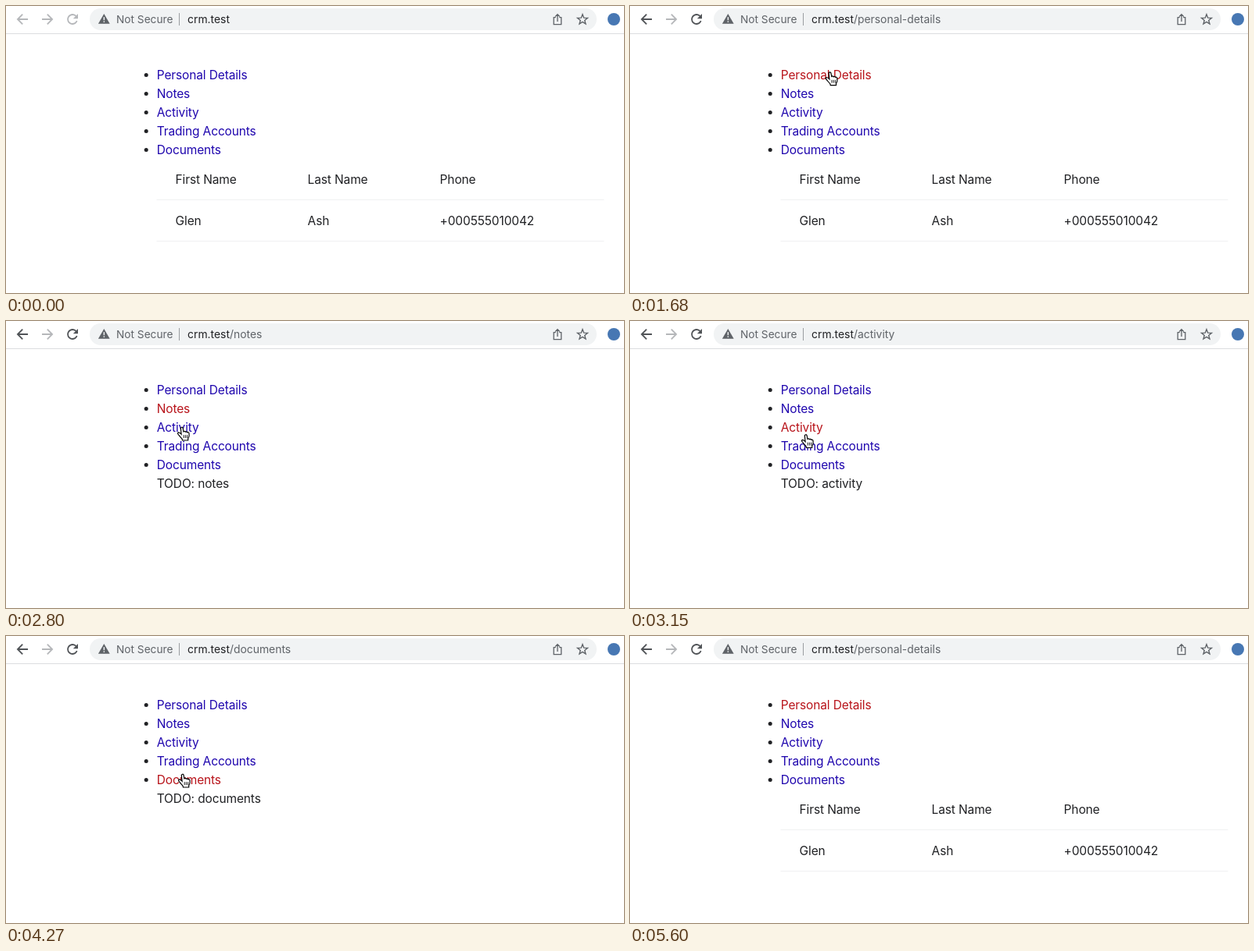
Write an HTML page with a canvas that moves like this. It is 790 by 368 pixels and loops after 5.81 s.

```html
<!DOCTYPE html>
<html lang="en">
<head>
<meta charset="utf-8">
<title>CRM navigation</title>
<style>
  html, body { margin: 0; width: 100%; height: 100%; overflow: hidden; background: #fff; }
  canvas { display: block; width: 790px; height: 368px; }
</style>
</head>
<body>
<canvas id="stage"></canvas>
<script>
const W = 790, H = 368, LOOP = 5810, STEP = 70;
const canvas = document.getElementById('stage');
const ctx = canvas.getContext('2d');
const dpr = window.devicePixelRatio || 1;
canvas.width = W * dpr;
canvas.height = H * dpr;

const INK = '#202124', GREY = '#5f6368', PALE = '#b5b7ba', PILL = '#f1f3f4';
const BLUE = '#1f06ae', RED = '#b8131a';
const BODY = '15.5px Inter, "Open Sans", sans-serif';
const LABEL = '13.7px Inter, "Open Sans", sans-serif';
const URL_FONT = '13.9px Inter, "Open Sans", sans-serif';

const links = ['Personal Details', 'Notes', 'Activity', 'Trading Accounts', 'Documents'];
const fields = [['First Name', 'Glen'], ['Last Name', 'Ash'], ['Phone', '+000555010042']];
const linkY = i => 88 + i * 24;

// Links are clicked in order, then the first one again.
const clicks = [1260, 2170, 2940, 3500, 4130, 5040];

// Each pointer move: start, end, x, y.
const entry = { x: 505, y: 296 }, enters = 70, leaves = 5600;
const moves = [
  [70, 420, 425, 171],
  [490, 910, 259, 82],
  [1610, 1960, 228, 107],
  [2170, 2590, 228, 126],
  [2660, 2800, 225, 136],
  [3010, 3290, 225, 155],
  [3570, 3850, 226, 177],
  [4270, 4480, 225, 148],
  [4760, 4970, 229, 86],
  [5110, 5460, 238, 345]
];

const ease = p => p * p * (3 - 2 * p);
const clamp = p => Math.min(1, Math.max(0, p));

function pointerAt(t) {
  let { x, y } = entry;
  for (const [from, to, x1, y1] of moves) {
    const p = ease(clamp((t - from) / (to - from)));
    x += (x1 - x) * p;
    y += (y1 - y) * p;
  }
  return { x, y };
}

function pageAt(t) {
  const done = clicks.filter(c => c < t).length;
  return done ? (done - 1) % links.length : -1;
}

function text(str, x, y, color, font = BODY) {
  ctx.font = font;
  ctx.letterSpacing = font === BODY ? '-0.13px' : '0px';
  ctx.fillStyle = color;
  ctx.fillText(str, x, y);
  return ctx.measureText(str).width;
}

function rect(x, y, w, h, color) {
  ctx.fillStyle = color;
  ctx.fillRect(x, y, w, h);
}

function stroke(path, color, width) {
  ctx.strokeStyle = color;
  ctx.lineWidth = width;
  ctx.stroke(new Path2D(path));
}

function fill(path, color) {
  ctx.fillStyle = color;
  ctx.fill(new Path2D(path));
}

function disc(x, y, r, color) {
  ctx.beginPath();
  ctx.arc(x, y, r, 0, Math.PI * 2);
  ctx.fillStyle = color;
  ctx.fill();
}

function arc(x, y, r, from, to, color, width) {
  ctx.beginPath();
  ctx.arc(x, y, r, from, to);
  ctx.strokeStyle = color;
  ctx.lineWidth = width;
  ctx.stroke();
}

function star(cx, cy, outer, inner) {
  ctx.beginPath();
  for (let i = 0; i < 10; i++) {
    const a = i * Math.PI / 5 - Math.PI / 2, r = i % 2 ? inner : outer;
    ctx.lineTo(cx + r * Math.cos(a), cy + r * Math.sin(a));
  }
  ctx.closePath();
  ctx.strokeStyle = GREY;
  ctx.lineWidth = 1.4;
  ctx.stroke();
}

// Horizontal arrow; dir is -1 for back, 1 for forward.
function navArrow(x, dir, color) {
  ctx.save();
  ctx.translate(x, 17);
  ctx.scale(dir, 1);
  stroke('M-7 0H5.5M-.2 -6.3L6.1 0L-.2 6.3', color, 1.8);
  ctx.restore();
}

function toolbar(page, active) {
  const tone = active ? '#505357' : PALE;
  rect(0, 35, W, 1, '#dcdde0');
  navArrow(21, -1, tone);
  navArrow(53, 1, PALE);
  arc(85, 17, 6, 0.35, -0.75, tone, 1.8);
  fill('M92 10V16.2H85.8Z', tone);

  ctx.beginPath();
  ctx.roundRect(107, 3, 648, 28, 14);
  ctx.fillStyle = PILL;
  ctx.fill();

  fill('M125.3 10L132.7 22.7H117.9Z', GREY);
  rect(124.6, 14.2, 1.5, 4, PILL);
  rect(124.6, 19.4, 1.5, 1.5, PILL);
  text('Not Secure', 141, 22, GREY, LABEL);
  rect(221, 9, 1, 16, '#9a9da1');

  const hostWidth = text('crm.test', 232, 22, INK, URL_FONT);
  if (page >= 0) {
    const slug = links[page].toLowerCase().replace(' ', '-');
    text('/' + slug, 232 + hostWidth, 22, GREY, URL_FONT);
  }

  stroke('M702.8 14.6H700.2V23.6H709.8V14.6H707.2M705 20V11M702 13.6L705 10.6L708 13.6', GREY, 1.3);
  star(737, 17.5, 6.8, 2.9);
  disc(777, 17, 8, '#4777b3');
}

function content(page) {
  links.forEach((label, i) => {
    disc(179.2, linkY(i) + 0.5, 2.5, INK);
    text(label, 192.7, linkY(i) + 6, i === page ? RED : BLUE);
  });
  if (page > 0) {
    text('TODO: ' + links[page].toLowerCase(), 192.7, 214, INK);
    return;
  }
  fields.forEach(([head, value], i) => {
    const x = 216.6 + i * 169;
    text(head, x, 228, INK);
    text(value, x, 281, INK);
  });
  for (const y of [248, 301]) rect(192.5, y, 572, 1, '#f0f1f2');
}

const HAND = 'M-1.7 1.3Q-.3 -.8 1.1 1.2L1.9 5.8Q3.2 4.6 4.3 6.2Q5.7 5.1 6.8 6.9' +
  'Q8.3 6 9 7.9L9.1 11Q8.9 13 7.7 14.6V17H.5L0 15Q-2 13.2 -3.2 11.4L-5.3 8.8' +
  'Q-5.8 7.2 -4.4 6.9Q-3 7 -.9 9.2Z';
const ARROW = 'M0 0V15L3.4 11.8L5.8 17.2L8.2 16.2L5.9 11H10.6Z';

function overLink(x, y) {
  ctx.font = BODY;
  return links.some((label, i) =>
    x >= 193 && x <= 193 + ctx.measureText(label).width && Math.abs(y - linkY(i)) <= 12);
}

function pointer({ x, y }, pressed) {
  ctx.save();
  ctx.translate(x, y);
  if (overLink(x, y)) {
    fill(HAND, '#fff');
    stroke(HAND, '#000', 1.2);
    stroke('M2.2 10.2V14M4.4 10.2V14M6.6 10.2V14', '#000', 0.9);
  } else {
    stroke(ARROW, '#fff', 2.2);
    fill(ARROW, '#000');
  }
  if (pressed) arc(0, 0, 29, 0, Math.PI * 2, '#000', 3);
  ctx.restore();
}

function draw(now) {
  const t = Math.floor((now % LOOP) / STEP) * STEP;
  const page = pageAt(t);
  ctx.setTransform(dpr, 0, 0, dpr, 0, 0);
  rect(0, 0, W, H, '#fff');
  toolbar(page, t >= enters);
  content(page);
  if (t >= enters && t < leaves) pointer(pointerAt(t), clicks.includes(t));
}

const start = performance.now();
function tick() {
  draw(performance.now() - start);
  requestAnimationFrame(tick);
}
tick();
</script>
</body>
</html>
```
